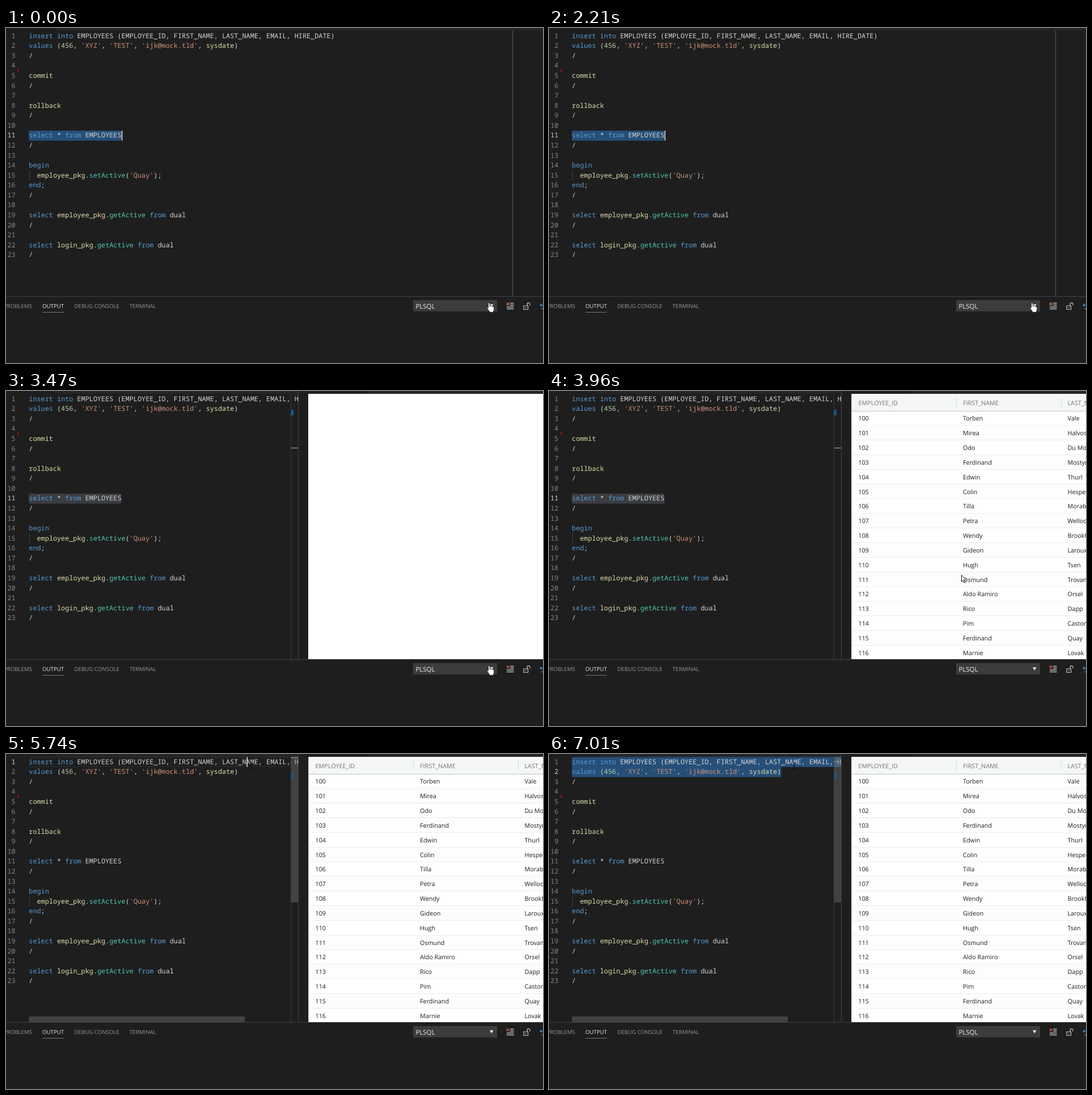
Recreate the animation shown at these times as an HTML page. Size 947x591 px, loop 8 s.

```html
<!DOCTYPE html>
<html lang="en">
<head>
<meta charset="utf-8">
<title>SQL editor</title>
<style>
html, body { margin: 0; width: 100%; height: 100%; overflow: hidden; background: #1e1e1e; }
svg { display: block; width: 100%; height: 100%; }
text { white-space: pre; text-rendering: geometricPrecision; font: 11.4px "Open Sans", "Noto Sans", sans-serif; }
.code text { font: 11.83px "Noto Sans Mono", "DejaVu Sans Mono", monospace; }
.tab text { font-size: 9.7px; }
.grid text { font-size: 10.8px; }
.key text { font-size: 9.8px; }
</style>
</head>
<body>
<svg id="stage" viewBox="0 0 947 591" xmlns="http://www.w3.org/2000/svg"></svg>
<script>
const LOOP = 8000;
const LINE = 17.57, TOP = 5.3, LEFT = 40.3, CHAR = 7.1;
const lineTop = i => TOP + i * LINE;
const colX = c => LEFT + c * CHAR;

const rect = (x, y, w, h, fill, extra = '') =>
  `<rect x="${x}" y="${y}" width="${w}" height="${h}" fill="${fill}" ${extra}/>`;
const text = (x, y, s, fill, extra = '') =>
  `<text x="${x}" y="${y}" fill="${fill}" ${extra}>${s}</text>`;
const path = (d, extra) => `<path d="${d}" ${extra}/>`;
const group = (id, body, cls = '') => `<g id="${id}" class="${cls}">${body}</g>`;

// Code
const source = `insert into EMPLOYEES (EMPLOYEE_ID, FIRST_NAME, LAST_NAME, EMAIL, HIRE_DATE)
values (456, 'XYZ', 'TEST', 'ijk@mock.tld', sysdate)
/

commit
/

rollback
/

select * from EMPLOYEES
/

begin
  employee_pkg.setActive('Quay');
end;
/

select employee_pkg.getActive from dual
/

select login_pkg.getActive from dual
/`.split('\n');

const tokens = /('[^']*')|\b(insert|into|values|select|from|begin|end)\b|\b(\d+)\b|\b(sysdate|commit|rollback|\w+_pkg)\b|\b([sg]etActive)\b/g;
const inks = ['#ce9178', '#569cd6', '#b5cea8', '#dcdcaa', '#4ec9b0'];
const highlight = s => s.replace(tokens, (m, ...parts) =>
  `<tspan fill="${inks[parts.findIndex(p => p)]}">${m}</tspan>`);

const codeText = source.map((s, i) => text(LEFT, lineTop(i) + 12.4, highlight(s), '#d4d4d4')).join('');
const numbers = source.map((s, i) =>
  text(16.6, lineTop(i) + 12.4, i + 1, '#858585', `class="num" text-anchor="end"`)).join('');

// Command palette
const commands = ['PLSQL - run current command', 'PLSQL - Activate connection', 'npm: Install Dependencies',
  'Developer: Open Webview Developer Tools', 'Tasks: Run Test Task', 'Local History: Show all',
  'View: Show Local history', 'Preferences: Open Settings (UI)', 'Preferences: Open User Settings',
  'Preferences: Open Raw Default Settings', 'Preferences: Open Settings',
  'Preferences: Open Workspace Settings', 'npm: Start', 'Go to Symbol in File...'];
const shortcuts = { 0: 'Ctrl 469 + 486 Enter 508', 4: 'Ctrl 559 + 577 F5 592', 10: 'Ctrl 567.5 + 585 , 596',
  12: 'Ctrl 545.5 + 563 R 576 S 594', 13: 'Ctrl 522.5 + 540 Shift 560 + 579 O 593' };
const keyWidth = { Ctrl: 26, Enter: 32, Shift: 31, F5: 21, ',': 13, O: 19 };
const rowY = i => 18 + i * 20.3;

function keys(row, spec) {
  const parts = spec.split(' ');
  let out = '';
  for (let i = 0; i < parts.length; i += 2) {
    const name = parts[i], x = +parts[i + 1], w = keyWidth[name] || 17;
    if (name !== '+') out += rect(x - w / 2, rowY(row) - 8, w, 16.5, 'rgba(128,128,128,.17)', 'rx="2.5"');
    out += text(x, rowY(row) + 3.5, name, '#ccc', 'text-anchor="middle"');
  }
  return out;
}

const palette = rect(65, -10, 554, 307, '#252526', 'filter="url(#shadow)"') +
  rect(71, 0, 543, 1.3, '#15527d') + rect(65, 8, 554, 20, '#062f4a') +
  commands.map((s, i) => text(75, rowY(i) + 4, s, i ? '#ccc' : '#e0e0e0')).join('') +
  text(603, 22, 'recently used', '#3794ff', 'text-anchor="end"') +
  `<g class="key">${Object.entries(shortcuts).map(([row, spec]) => keys(row, spec)).join('')}</g>`;

// Result grid
const people = `Torben Vale,Mirea Halvost,Odo Du Morne,Ferdinand Mostyn,Edwin Thurl,Colin Hespen,Tilla Morabesk,Petra Wellock,Wendy Brookfen,Gideon Laroux,Hugh Tsen,Osmund Trovano,Aldo_Ramiro Orsel,Rico Dapp,Pim Castory,Ferdinand Quay,Marnie Lovak`.split(',');
const cols = [545.5, 730, 914.5];
const ROW = 25.84, HEAD = 35.3;

const cells = people.map((p, i) => {
  const y = HEAD + i * ROW;
  const [, first, last] = p.match(/(\S+) (.+)/);
  return rect(534, y, 413, ROW, i % 2 ? '#fcfdfe' : '#fff') + rect(534, y + ROW - .5, 413, 1, '#d9dcde') +
    [100 + i, first.replace('_', ' '), last].map((s, c) => text(cols[c], y + 17, s, '#1c1c1c')).join('');
}).join('');
const grid = rect(533, 5, 414, 30, '#f5f7f7') + cells + rect(533, 35, 414, 1, '#bdc3c7') +
  rect(533, 5, 1, 468, '#bdc3c7') + rect(718, 13, 1, 15, '#d0d5d8') + rect(903, 13, 1, 15, '#d0d5d8') +
  ['EMPLOYEE_ID', 'FIRST_NAME', 'LAST_NAME'].map((s, c) => text(cols[c], 25, s, '#737575')).join('');

// Bottom panel
const panel = rect(0, 473, 947, 118, '#1e1e1e') + rect(0, 473, 947, 1, '#414141') +
  `<g class="tab">` + text(46, 493.5, 'PROBLEMS', '#979797', 'text-anchor="end"') +
  text(64, 493.5, 'OUTPUT', '#e7e7e7') + text(120.5, 493.5, 'DEBUG CONSOLE', '#979797') +
  text(218, 493.5, 'TERMINAL', '#979797') + '</g>' + rect(64, 501, 38, 1, '#777') +
  rect(718, 480, 148, 20, '#3c3c3c') + text(722.5, 494.7, 'PLSQL', '#f0f0f0') +
  path('M853 487.5h6.6l-3.3 5.2z', 'fill="#f0f0f0"') +
  path('M889 485.5h6.5M889 488.8h6.5M883 492.2h12.5M883 495.5h12.5', 'stroke="#c5c5c5" stroke-width="1.4"') +
  path('M882.8 484.5l4.6 4.8m0-4.8l-4.6 4.8', 'id="cross" stroke-width="1.4"') +
  path('M913 490h7.5v6.5h-7.5zM919.2 490v-3a2.4 2.4 0 0 1 4.8 0v2.5M916.7 492.3v2',
    'stroke="#c5c5c5" stroke-width="1.2" fill="none"') +
  path('M942 489h5M944.5 486.5l-2.5 2.5l2.5 2.5M944 495.5h3', 'stroke="#3d87bd" stroke-width="1.3" fill="none"');

// Pointers, each with its hot spot or middle at 0,0
const pointers = {
  hand: path('M0 1.5c0-2 2.7-2 2.7 0v4.2c.6-.9 2.3-.7 2.5.3c.7-.7 2.2-.5 2.5.6c.9-.6 2.4 0 2.4 1.5v3.4c0 1.8-1 2.6-1.2 4.9h-6.4c-.5-2.4-2.6-4-4.2-6.6c-.9-1.6.8-2.5 1.7-1.4z',
    'fill="#fff" stroke="#111" stroke-width=".8"'),
  arrow: path('M.5 .8v11.8l2.7-2.5l1.8 4.2l1.8-.8l-1.8-4h3.6z', 'fill="#fff" stroke="#000" stroke-width=".9"'),
  beam: path('M-2 -5.5h1.5l.5 .5l.5-.5h1.5M0 -5v10M-2 5.5h1.5l.5-.5l.5 .5h1.5', 'fill="none" stroke="#000" stroke-width="1"')
};

const stage = document.getElementById('stage');
stage.innerHTML =
  `<defs><filter id="shadow" x="-10%" y="-10%" width="120%" height="120%">
    <feDropShadow dx="0" dy="3" stdDeviation="3.5" flood-color="#000" flood-opacity=".9"/></filter></defs>` +
  rect(0, 0, 947, 591, '#1e1e1e') + rect(88, 0, 859, 5, '#252526') +
  group('ruler', rect(893, 5, 1, 468, '#5a5a5a')) +
  group('current', rect(41, 6, 461, 16, 'none', 'stroke="#2a2a2a" stroke-width="1.6"')) +
  group('marks', '') +
  rect(41, lineTop(14), 1, LINE, '#404040') +
  group('code', codeText + numbers, 'code') +
  path('M20.5 71.2v7.6l3.6-3.8z', 'fill="#94151b"') +
  group('caret', rect(-.5, 0, 1.5, LINE, '#e4e4e0')) +
  group('split',
    group('scroll', rect(503, 5, 12, 257, '#797979', 'fill-opacity=".4"') +
      rect(40.5, 463, 380.5, 10, '#797979', 'fill-opacity=".4"')) +
    rect(502, 5, 1, 468, '#3b3b3b') + rect(515, 0, 432, 473, '#1e1e1e') + rect(515, 0, 1, 473, '#444') +
    rect(638, 0, 309, 5, '#252526') +
    group('blue', rect(503, 33, 4, 10, '#0e5c93')) +
    group('spot', rect(503, -.7, 12, 1.5, '#8a8a8a'))) +
  group('blank', rect(533, 5, 414, 468, '#fff')) +
  group('grid', grid, 'grid') + panel + group('palette', palette) +
  Object.entries(pointers).map(([id, body]) => group(id, body)).join('');

const el = id => document.getElementById(id);
const show = (id, on) => el(id).setAttribute('display', on ? 'inline' : 'none');
const move = (id, x, y) => el(id).setAttribute('transform', `translate(${x} ${y})`);
const at = (list, t) => list.filter(k => k[0] <= t).pop();
const within = (t, a, b) => t >= a && t < b;

// [time, x, line]
const carets = [[0, 204.3, 10], [310], [2210, 204.3, 10], [2490], [5740, 425, 0], [5890, LEFT, 0],
  [6190, LEFT, 1], [6510, 410.5, 1], [7010]];
// [time, pointer, x, y]
const mouse = [[0, 'hand', 850.5, 485], [3660, 'arrow', 836, 456], [3735, 'arrow', 812, 420], [3810, 'arrow', 786, 380],
  [3960, 'arrow', 727, 324], [4050, 'arrow', 672, 272], [4140, 'arrow', 620, 222], [4230, 'arrow', 585, 190],
  [4320, 'arrow', 566, 174], [4520, ''], [4820, 'beam', 460, 84], [4900, 'beam', 414, 45],
  [4960, 'beam', 416, 24], [5030, 'beam', 421, 10], [5100, 'beam', 427, 14], [5170, 'beam', 432, 19], [5420, 'beam', 432, 20.5]];
// [time, active line, overview mark]
const active = [[0, 10, 100.5], [5740, 0, 6.3], [6190, 1, 13.5]];

const nums = [...document.querySelectorAll('.num')];
const band = (line, end, fill) =>
  rect(LEFT, lineTop(line), end - LEFT, LINE + .2, fill, 'rx="2"');

function selection(t) {
  const blue = '#264f78';
  if (t < 5740) return band(10, colX(23), within(t, 870, 2210) || t >= 2490 ? '#3a3d41' : blue);
  if (t < 6190) return '';
  return band(0, 517, blue) + (t >= 6510 ? band(1, colX(52), blue) : '');
}

function scrollAlpha(t) {
  if (t < 3470) return .42;
  return Math.min(1, Math.max(0, (t - 4930) / 240));
}

function draw(t) {
  const split = t >= 2490;
  show('ruler', !split);
  show('split', split);
  show('palette', within(t, 870, 2210));
  show('blue', t >= 3050);
  show('blank', t >= 3470);
  show('grid', t >= 3960);
  show('current', within(t, 5740, 6190));
  el('scroll').setAttribute('opacity', scrollAlpha(t));
  el('cross').setAttribute('stroke', split ? '#e0524a' : '#dd7c4c');
  el('marks').innerHTML = selection(t);

  const [, line, mark] = at(active, t);
  nums.forEach((n, i) => n.setAttribute('fill', i === line ? '#d0d0d0' : '#858585'));
  move('spot', 0, mark);

  const [, x, row] = at(carets, t);
  show('caret', x !== undefined);
  if (x !== undefined) move('caret', x, lineTop(row));

  const [, kind, mx, my] = at(mouse, t);
  for (const id in pointers) show(id, id === kind);
  if (kind) move(kind, mx, my);
}

const start = performance.now();
function tick() {
  draw((performance.now() - start) % LOOP);
  requestAnimationFrame(tick);
}
tick();
</script>
</body>
</html>
```
